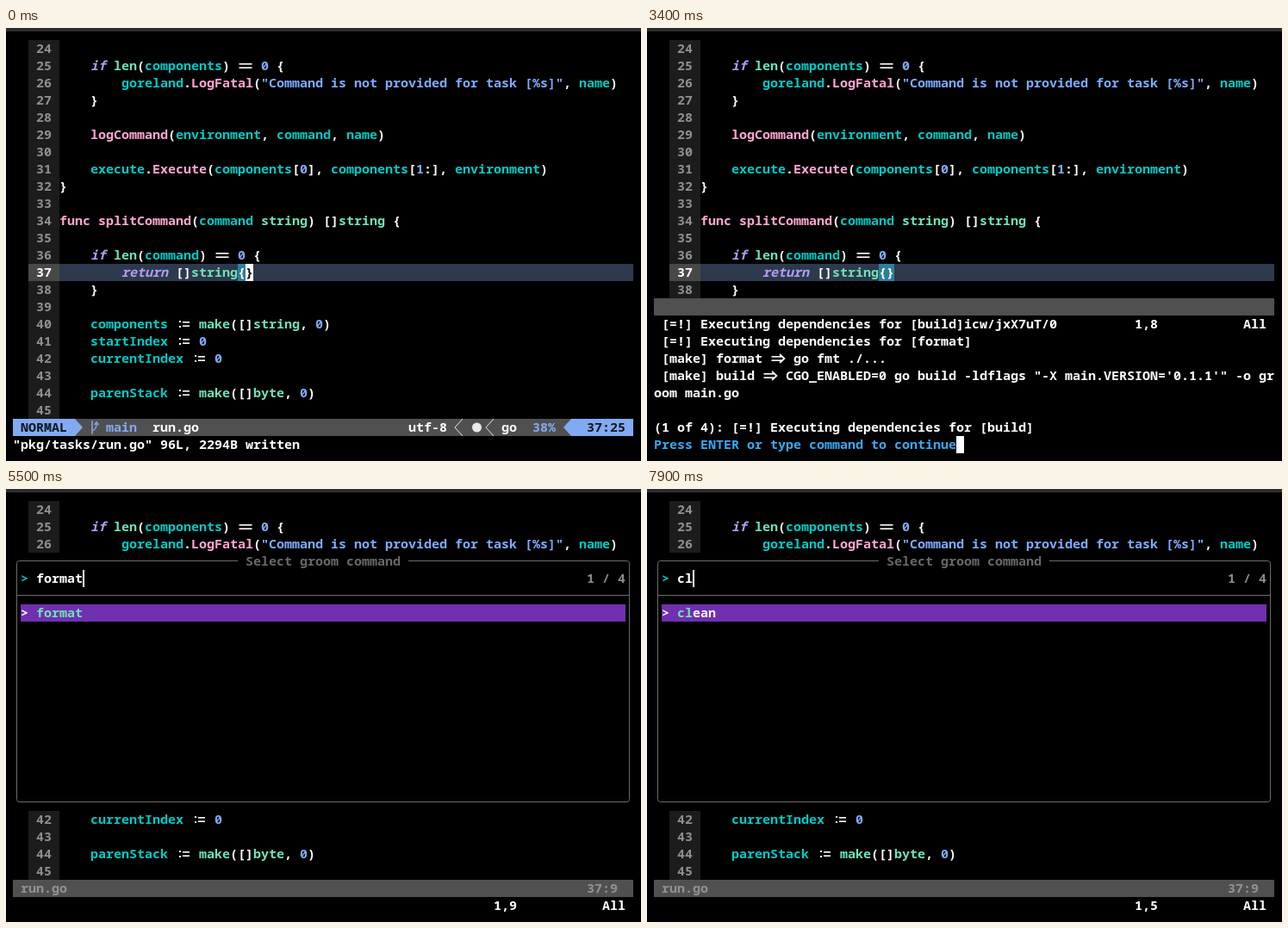
An HTML page with a canvas for the animation above (8 s loop, 737 by 503 pixels).

```html
<!DOCTYPE html>
<html lang="en">
<head>
<meta charset="utf-8">
<title>Editor session</title>
<style>
  html, body { margin: 0; width: 100%; height: 100%; overflow: hidden; background: #000; }
  canvas { display: block; }
</style>
</head>
<body>
<canvas id="stage" width="737" height="503"></canvas>
<script>
const ctx = document.getElementById('stage').getContext('2d');
const FONT = '600 15px "Noto Sans Mono", "DejaVu Sans Mono", monospace';
const CELL = 9, ROW = 20, LOOP = 8000;
const WHITE = '#fff', GREY = '#8c8c8c', TEAL = '#00cbc6', PINK = '#ffa6d2', GREEN = '#6fe3b4',
      PURPLE = '#b49cf5', BLUE = '#82aaf2', BAR = '#505050', DARK = '#10161f';

const CODE = `
    if len(components) == 0 {
        goreland.LogFatal("Command is not provided for task [%s]", name)
    }

    logCommand(environment, command, name)

    execute.Execute(components[0], components[1:], environment)
}

func splitCommand(command string) []string {

    if len(command) == 0 {
        return []string{}
    }

    components := make([]string, 0)
    startIndex := 0
    currentIndex := 0

    parenStack := make([]byte, 0)
`.split('\n');
const FIRST_LINE = 24, CURRENT = 13;

const WORD_COLORS = new Map([
  [PURPLE, 'if return'],
  [PINK, 'func LogFatal Execute logCommand splitCommand'],
  [GREEN, 'len make string byte'],
].flatMap(([color, words]) => words.split(' ').map(word => [word, color])));

const x = col => 8 + CELL * col;
const y = row => 14 + ROW * row;

function rect(left, top, width, height, color) {
  ctx.fillStyle = color;
  ctx.fillRect(left, top, width, height);
}

function cells(col, row, count, color) {
  rect(x(col), y(row), count * CELL, ROW, color);
}

function shape(points, color) {
  ctx.fillStyle = color;
  ctx.beginPath();
  points.forEach(([px, py]) => ctx.lineTo(px, py));
  ctx.fill();
}

function stroke(path, color, width) {
  ctx.strokeStyle = color;
  ctx.lineWidth = width;
  ctx.stroke(new Path2D(path));
}

function chars(str, col, row, color, italic) {
  ctx.font = (italic ? 'italic ' : '') + FONT;
  ctx.fillStyle = color;
  [...str].forEach((ch, i) => ctx.fillText(ch, x(col + i), y(row) + 15));
}

// Two-cell operators are drawn joined, like a ligature font does.
function operator(op, col, row, color) {
  const left = x(col), top = y(row);
  if (op === ':=') {
    rect(left + 4, top + 6, 2, 2, color);
    rect(left + 4, top + 12, 2, 2, color);
    rect(left + 8, top + 7, 8, 1.6, color);
    rect(left + 8, top + 11.4, 8, 1.6, color);
    return;
  }
  const width = op === '==' ? 15 : 12;
  rect(left + 1.5, top + 7, width, 1.6, color);
  rect(left + 1.5, top + 11.4, width, 1.6, color);
  if (op === '=>') stroke(`M${left + 11} ${top + 5}l5.5 5l-5.5 5`, color, 1.7);
}

function text(str, col, row, color = WHITE) {
  for (const { 0: part, index } of str.matchAll(/==|:=|=>|\S+?(?===|:=|=>|\s|$)/g)) {
    if (/^(==|:=|=>)$/.test(part)) operator(part, col + index, row, color);
    else chars(part, col + index, row, color);
  }
}

function codeColor(token) {
  if (token[0] === '"') return '#7eabff';
  if (/^\d/.test(token)) return BLUE;
  if (/^\w/.test(token)) return WORD_COLORS.get(token) || TEAL;
  return WHITE;
}

function codeLine(row) {
  const current = row === CURRENT;
  if (current) cells(6, row, 74, '#2d394d');
  cells(2, row, 4, current ? '#484848' : '#1c1c1c');
  chars(String(FIRST_LINE + row), 3, row, current ? WHITE : '#8f8f8f');
  for (const { 0: token, index } of CODE[row].matchAll(/"[^"]*"|[A-Za-z]\w*|\d+|==|:=|\S/g)) {
    const color = codeColor(token);
    if (token === '==' || token === ':=') operator(token, index + 6, row, color);
    else chars(token, index + 6, row, color, color === PURPLE);
  }
}

function codeRows(from, to) {
  for (let row = from; row < to; row++) codeLine(row);
}

function block(char, col, row, bg, fg) {
  cells(col, row, 1, bg);
  chars(char, col, row, fg);
}

const matchBrace = (char, col) => block(char, col, CURRENT, '#2f7f9b', WHITE);

function ruler(row, column) {
  text('1,' + column, 62, row);
  text('All', 76, row);
}

function statusLine(position) {
  const top = y(22), middle = top + 10, bottom = top + ROW;
  cells(0, 22, 80, BAR);
  cells(0, 22, 8, BLUE);
  shape([[80, top], [89, middle], [80, bottom]], BLUE);
  text('NORMAL', 1, 22, DARK);
  stroke(`M100 ${top + 2}V${bottom - 2}M100 ${top + 14}Q105 ${top + 12} 105 ${top + 6}M102.5 ${top + 7}l2.5 -3l2.5 3`, BLUE, 1.5);
  text('main', 12, 22, BLUE);
  text('run.go', 18, 22);
  text('utf-8', 51, 22);
  for (const left of [521, 557])
    stroke(`M${left + 9} ${top}L${left} ${middle}L${left + 9} ${bottom}`, '#e8e8e8', 1);
  ctx.fillStyle = '#e8e8e8';
  ctx.beginPath();
  ctx.arc(546.5, middle, 5.5, 0, 7);
  ctx.fill();
  text('go', 63, 22);
  text('38%', 67, 22, BLUE);
  shape([[656, top], [647, middle], [656, bottom]], BLUE);
  cells(72, 22, 8, BLUE);
  text(position, 74, 22, DARK);
}

const WRITTEN = '"pkg/tasks/run.go" 96L, 2294B written';

function editor({ first, keys = '' }) {
  codeRows(0, 22);
  if (first) {
    matchBrace('{', 29);
    block('}', 30, CURRENT, WHITE, '#000');
    text(WRITTEN, 0, 23);
  } else {
    cells(14, CURRENT, 1, WHITE);
    chars('r', 14, CURRENT, '#000', true);
  }
  statusLine(first ? '37:25' : '37:9');
  text(keys, 69, 23);
}

const COMMANDS = ['build', 'format', 'clean', 'install'];

function picker({ first, query = '' }) {
  // Filtering starts with the second typed character.
  const filter = query.length > 1 ? query : '';
  const found = COMMANDS.filter(name => name.startsWith(filter));
  codeRows(0, 3);
  codeRows(18, 22);
  stroke('M269 83.5H15.5Q12.5 83.5 12.5 86.5V360.5Q12.5 363.5 15.5 363.5H720.5Q723.5 363.5 723.5 360.5V86.5Q723.5 83.5 720.5 83.5H467M12.5 123.5H723.5', '#6c6c6c', 1);
  text('Select groom command', 30, 3, '#686868');
  text('>', 1, 4, TEAL);
  text(query, 3, 4);
  rect(x(3 + query.length), y(4), 2, ROW, WHITE);
  text(`${found.length} / 4`, 74, 4, GREY);
  cells(1, 6, 78, '#7030b0');
  text('>', 1, 6);
  found.forEach((name, i) => {
    text(name, 3, 6 + i);
    if (filter) {
      cells(3, 6 + i, filter.length, '#7030b0');
      text(filter, 3, 6 + i, GREEN);
    }
  });
  cells(0, 22, 80, BAR);
  text('run.go', 1, 22, '#929292');
  text(first ? '37:25' : '37:9', 74, 22, '#929292');
  if (first) text(WRITTEN, 0, 23);
  ruler(23, 3 + query.length);
}

function output({ first, lines, column }) {
  const top = 23 - lines.length;
  codeRows(0, top - 1);
  if (first) {
    matchBrace('{', 29);
    matchBrace('}', 30);
  }
  cells(0, top - 1, 80, BAR);
  lines.forEach((line, i) => text(line, 0, top + i));
  ruler(top, column);
  text('Press ENTER or type command to continue', 0, 23, '#38a9f5');
  cells(39, 23, 1, WHITE);
}

const BUILD_LOG = [
  ' [=!] Executing dependencies for [build]icw/jxX7uT/0',
  ' [=!] Executing dependencies for [format]',
  ' [make] format => go fmt ./...',
  ` [make] build => CGO_ENABLED=0 go build -ldflags "-X main.VERSION='0.1.1'" -o gr`,
  'oom main.go',
  '',
  '(1 of 4): [=!] Executing dependencies for [build]',
];
const FORMAT_LOG = [
  ' [=!] Executing dependencies for [format]icw/jxX7uT/1',
  ' [make] format => go fmt ./...',
  '',
  '(1 of 2): [=!] Executing dependencies for [format]',
];

const first = true;
const STEPS = [
  [0, editor, { first }],
  [1200, editor, { first, keys: '<20>' }],
  [1300, editor, { first, keys: '<20>g' }],
  [1700, picker, { first }],
  [2000, picker, { first, query: 'b' }],
  [2100, picker, { first, query: 'bu' }],
  [2300, picker, { first, query: 'build' }],
  [3400, output, { first, lines: BUILD_LOG, column: 8 }],
  [4100, editor, {}],
  [4400, editor, { keys: '<20>' }],
  [4500, editor, { keys: '<20>g' }],
  [4600, picker, {}],
  [5200, picker, { query: 'f' }],
  [5500, picker, { query: 'format' }],
  [5800, output, { lines: FORMAT_LOG, column: 9 }],
  [6500, editor, {}],
  [7000, editor, { keys: '<20>g' }],
  [7200, picker, {}],
  [7900, picker, { query: 'cl' }],
];

const start = performance.now();
let shown;

function frame() {
  const time = (performance.now() - start) % LOOP;
  const step = STEPS.findLast(([at]) => at <= time);
  if (step !== shown) {
    shown = step;
    rect(0, 0, 737, 503, '#000');
    rect(0, 0, 737, 4, '#2e2e2e');
    step[1](step[2]);
  }
  requestAnimationFrame(frame);
}
frame();
</script>
</body>
</html>
```
